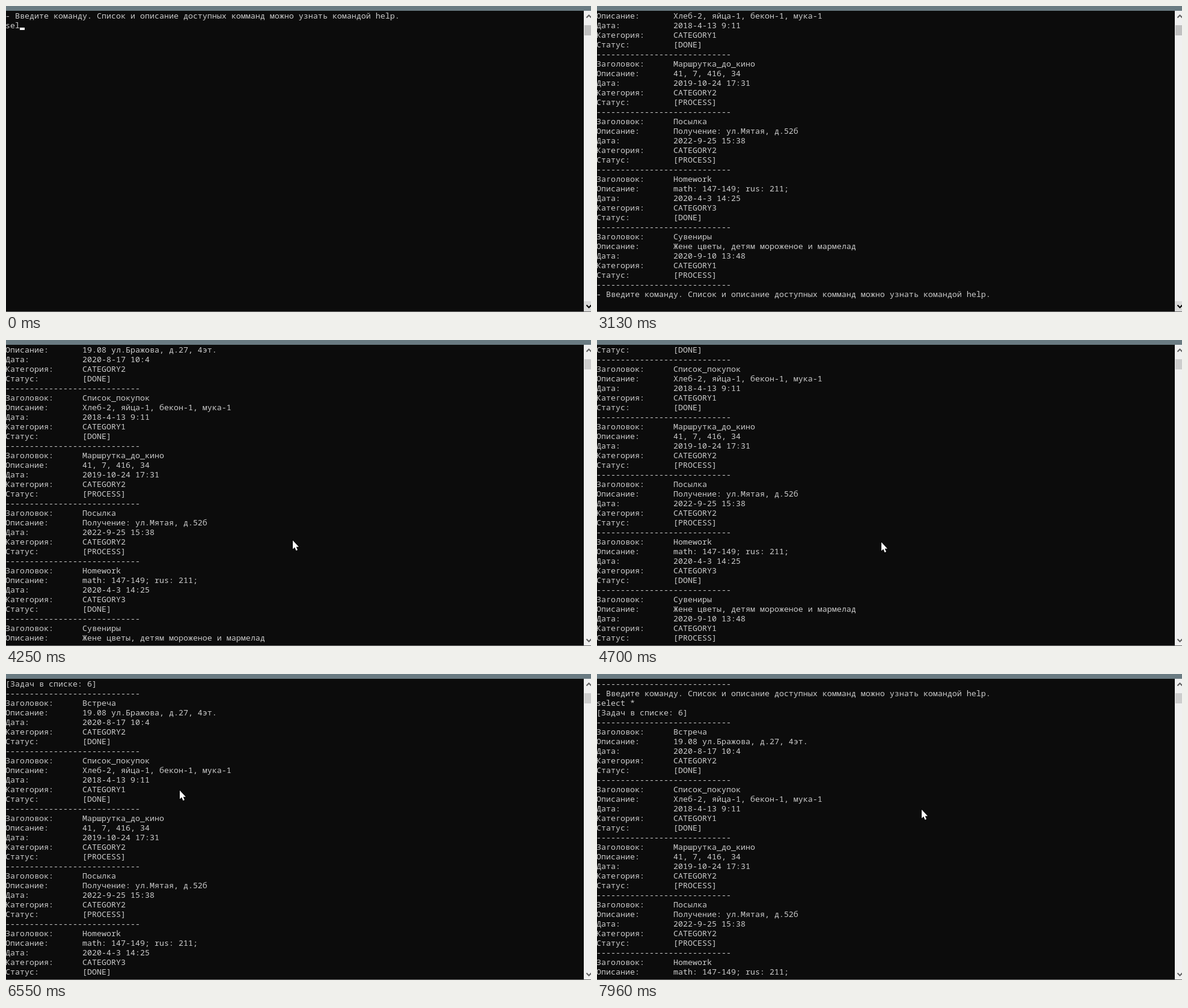
An HTML page for the animation above (7.99 s loop, 973 by 510 pixels).

```html
<!DOCTYPE html>
<html lang="ru">
<head>
<meta charset="utf-8">
<title>Список задач</title>
<style>
  html, body { margin: 0; width: 100%; height: 100%; overflow: hidden; background: #0c0c0c; }
  #stage { position: relative; width: 973px; height: 510px; overflow: hidden; background: #0c0c0c; }
  #stage > * { position: absolute; }
  #title { left: 0; top: 0; width: 973px; height: 8px; background: #6a7b82; }
  #edge { left: 0; top: 509px; width: 973px; height: 1px; background: #707070; }
  #text {
    left: -1px; top: 8px; margin: 0; width: 960px; height: 496px; overflow: hidden;
    font: 13.3333px/16px "Noto Sans Mono", "DejaVu Sans Mono", monospace;
    font-variant-ligatures: none; color: #ccc; white-space: pre;
  }
  #caret { width: 8px; height: 4px; background: #fff; }
  #bar { left: 961px; top: 8px; }
  #pointer { left: 0; top: 0; overflow: visible; }
</style>
</head>
<body>
<div id="stage">
  <div id="title"></div>
  <pre id="text"></pre>
  <div id="caret"></div>
  <svg id="bar" width="12" height="501">
    <rect width="12" height="501" fill="#f0f0f0"/>
    <rect id="thumb" x="1" y="24" width="11" height="17"/>
    <rect id="button" y="484" width="12" height="17"/>
    <g fill="none" stroke-width="2">
      <path d="M4.5 11.5 8.5 7.5 12.5 11.5" stroke="#606060"/>
      <path id="down" d="M4.5 490.5 8.5 494.5 12.5 490.5"/>
    </g>
  </svg>
  <div id="edge"></div>
  <svg id="pointer" width="12" height="19">
    <path d="M0 0V14.5L3.2 11.6 5.5 17 8 16 5.7 10.7H10Z" fill="#fff" stroke="#000" stroke-width="1.5" paint-order="stroke"/>
  </svg>
</div>
<script>
const LOOP = 7990, OUTPUT_AT = 2360, POINTER_AT = 3280;
const ROWS = 31, CELL_W = 8, CELL_H = 16;
const $ = id => document.getElementById(id);

const dashes = '-'.repeat(28);
const prompt = '- Введите команду. Список и описание доступных комманд можно узнать командой help.';
const labels = ['Заголовок:', 'Описание:', 'Дата:', 'Категория:', 'Статус:'];
const tasks = [
  ['Встреча', '19.08 ул.Бражова, д.27, 4эт.', '2020-8-17 10:4', 'CATEGORY2', '[DONE]'],
  ['Список_покупок', 'Хлеб-2, яйца-1, бекон-1, мука-1', '2018-4-13 9:11', 'CATEGORY1', '[DONE]'],
  ['Маршрутка_до_кино', '41, 7, 416, 34', '2019-10-24 17:31', 'CATEGORY2', '[PROCESS]'],
  ['Посылка', 'Получение: ул.Мятая, д.52б', '2022-9-25 15:38', 'CATEGORY2', '[PROCESS]'],
  ['Homework', 'math: 147-149; rus: 211;', '2020-4-3 14:25', 'CATEGORY3', '[DONE]'],
  ['Сувениры', 'Жене цветы, детям мороженое и мармелад', '2020-9-10 13:48', 'CATEGORY1', '[PROCESS]']
];
const formatTask = task => [...task.map((value, i) => labels[i].padEnd(16) + value), dashes];
const buffer = [dashes, prompt, 'select *', `[Задач в списке: ${tasks.length}]`, dashes,
  ...tasks.flatMap(formatTask), prompt, ''];

// [time, typed text, caret shown]
const typing = [
  [0, 'sel', true], [90, 'sele', true], [300, 'selec', true], [480, 'select', true],
  [510, 'select ', false], [780, 'select ', true], [1040, 'select ', false],
  [1560, 'select ', true], [1870, 'select *', true], [2080, 'select *', false],
  [OUTPUT_AT, '', true], [3130, '', false]
];

// [time, first visible line]
const scrolling = [[0, 1], [OUTPUT_AT, 12], [3600, 9], [4050, 6], [4460, 9], [5160, 6], [5190, 3], [6760, 0]];

// Pointer moves: start, end, number of steps, way points
const moves = [
  [POINTER_AT, 3670, 11, [[980, 497], [479, 331]]],
  [4250, 4280, 2, [[479, 331], [474, 336]]],
  [4700, 4700, 1, [[474, 336], [473, 337]]],
  [5160, 5190, 2, [[473, 337], [469, 337]]],
  [5940, 6550, 20, [[469, 337], [330, 250], [225, 206], [289, 194]]],
  [6760, 7540, 18, [[289, 194], [215, 130], [165, 144]]],
  [7570, 7960, 11, [[165, 144], [540, 226]]]
];

const current = (table, t) => table.findLast(row => row[0] <= t);
const smooth = p => p * p * (3 - 2 * p);

function pointOn(points, p) {
  const at = p * (points.length - 1);
  const i = Math.min(Math.floor(at), points.length - 2);
  return points[i].map((v, axis) => Math.round(v + (points[i + 1][axis] - v) * (at - i)));
}

function pointerAt(t) {
  const [start, end, steps, points] = current(moves, t);
  const interval = (end - start) / (steps - 1) || 1;
  const step = Math.min(steps, Math.floor((t - start) / interval + 1e-6) + 1);
  return pointOn(points, smooth(step / steps));
}

let shown = null;
function showText(text) {
  if (text !== shown) $('text').textContent = shown = text;
}

function render(t) {
  const [, typed, caretOn] = current(typing, t);
  const top = current(scrolling, t)[1];
  const lines = t < OUTPUT_AT ? [dashes, prompt, typed] : buffer;
  showText(lines.slice(top, top + ROWS).join('\n'));

  const caretRow = lines.length - 1 - top;
  const caret = $('caret').style;
  caret.display = caretOn && caretRow < ROWS ? '' : 'none';
  caret.left = typed.length * CELL_W - 1 + 'px';
  caret.top = 8 + caretRow * CELL_H + 12 + 'px';

  const active = t >= POINTER_AT;
  $('thumb').setAttribute('fill', active ? '#cdcdcd' : '#c0c0c0');
  $('button').setAttribute('fill', active ? '#f0f0f0' : '#dadada');
  $('down').setAttribute('stroke', active ? '#606060' : '#000');
  $('pointer').style.display = active ? '' : 'none';
  if (active) {
    const [x, y] = pointerAt(t);
    $('pointer').style.transform = `translate(${x}px, ${y}px)`;
  }
}

const began = performance.now();
function tick() {
  render((performance.now() - began) % LOOP);
  requestAnimationFrame(tick);
}
tick();
</script>
</body>
</html>
```
